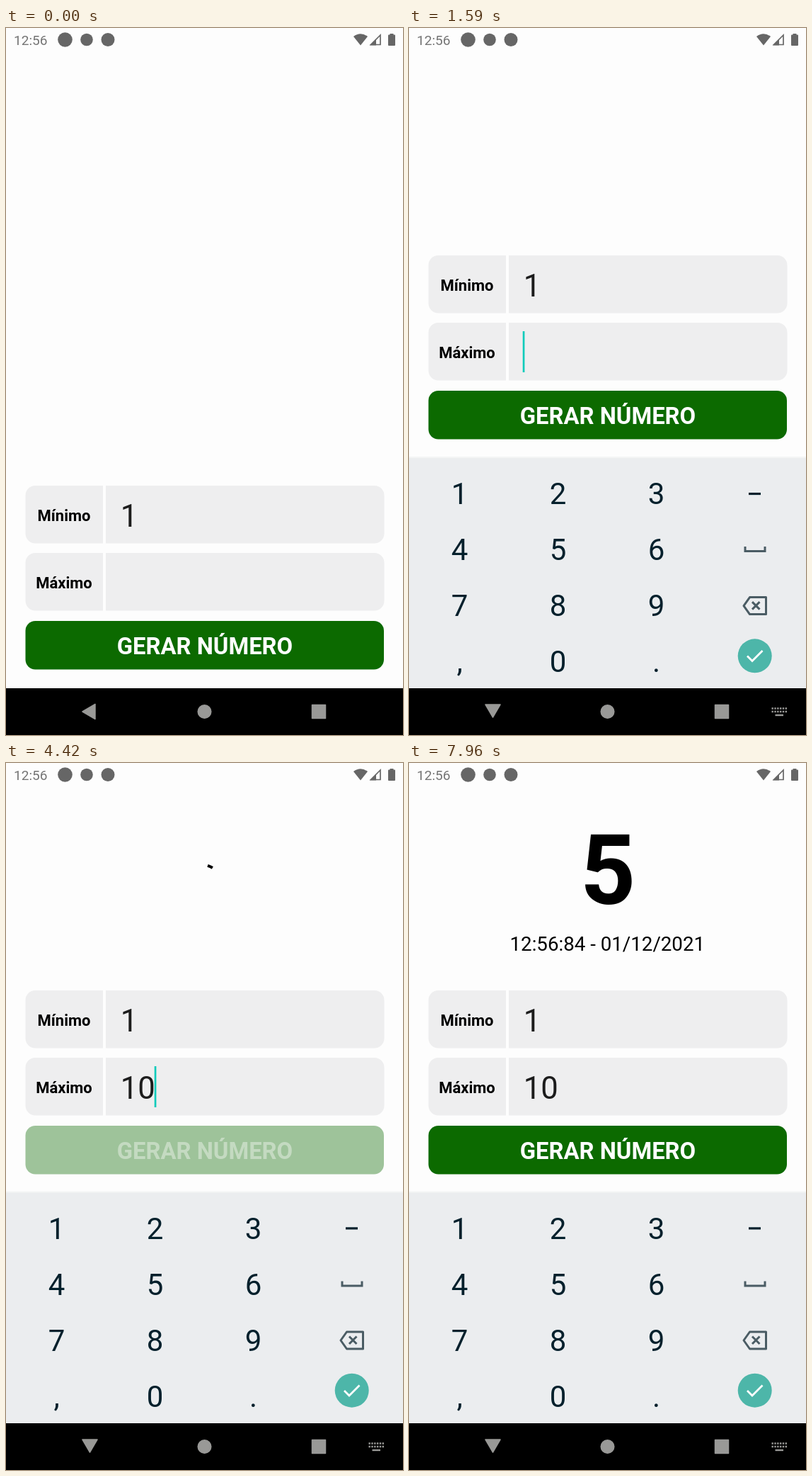
An HTML page that plays this animation: 561 by 998 pixels, repeating every 8000 ms.

```html
<!DOCTYPE html>
<html lang="pt">
<head>
<meta charset="utf-8">
<title>Gerar número</title>
<style>
  html, body { margin: 0; width: 100%; height: 100%; overflow: hidden; background: #fdfdfd; }
  svg { display: block; width: 100%; height: 100%; font-family: Roboto, sans-serif; }
  .mid { text-anchor: middle; }
  .bold { font-weight: 700; }
  .label { font-size: 22px; }
  .value { font-size: 43.64px; fill: #1c1c1c; }
  .field { fill: #eeeeef; }
  .key { font-size: 42px; fill: #04202c; }
  .line { fill: none; stroke: #4a5c64; stroke-width: 3; }
</style>
</head>
<body>
<svg viewBox="0 0 561 998">
  <rect width="561" height="998" fill="#fdfdfd"/>

  <g id="status" fill="#666">
    <text x="11" y="24" font-size="19.1" fill="#757575">12:56</text>
    <circle cx="83.5" cy="16.5" r="10.3"/>
    <circle cx="114" cy="16.5" r="8.8"/>
    <circle cx="144" cy="16.5" r="9.5"/>
    <path d="M491 12Q501 4.500 511 12L501 24.500Z"/>
    <path d="M515.500 23.500L529 10V23.500Z" fill="none" stroke="#666" stroke-width="1.7"/>
    <path d="M514 24.500L523 15.500V24.500Z"/>
    <path d="M542.500 9.500V8H547.500V9.500H549Q550 9.500 550 10.500V24Q550 25 549 25H541Q540 25 540 24V10.500Q540 9.500 541 9.500Z"/>
  </g>

  <circle id="spinner" cx="281" cy="163" r="18.4" pathLength="360" fill="none"
    stroke="#000" stroke-width="4.1" stroke-linecap="square"/>
  <g id="result" class="mid">
    <text class="bold" x="281" y="198.700" font-size="136.4">5</text>
    <text x="280.300" y="265" font-size="27.7">12:56:84 - 01/12/2021</text>
  </g>

  <g id="form">
    <g id="fields"></g>
    <rect id="cursor" y="753" width="2.700" height="58" fill="#0fcbbb"/>
    <rect id="button" x="27.500" y="837" width="506.500" height="68.500" rx="14" fill="#0c6a00"/>
    <text id="caption" class="mid bold" x="281" y="884" font-size="32.8" fill="#fff">GERAR NÚMERO</text>
  </g>

  <g id="keyboard">
    <rect y="604.500" width="561" height="3" fill="#f4f5f5"/>
    <rect y="606.500" width="561" height="366" fill="#ebedef"/>
    <g id="keys" class="mid key"></g>
    <rect x="480" y="655.300" width="17" height="3.200" fill="#04202c"/>
    <path class="line" d="M475 731.500V738H503V731.500"/>
    <path class="line" stroke-linejoin="round" d="M481.500 803H504.500V827H481.500L473 815Z"/>
    <path class="line" d="M485 809.500L495.500 820M495.500 809.500L485 820"/>
    <circle cx="488.700" cy="885.700" r="24" fill="#4db6a9"/>
    <path d="M478 886L485 893L499.500 878.500" fill="none" stroke="#fff" stroke-width="2.800"/>
  </g>

  <rect y="932" width="561" height="66"/>
  <g fill="#999997" stroke="#999997" stroke-width="1.500" stroke-linejoin="round">
    <path id="back" d="M108 965L126 954.500V975.500Z"/>
    <path id="down" d="M108 955H129L118.500 973Z"/>
    <circle cx="280.500" cy="965" r="9.300"/>
    <rect x="432.500" y="955.500" width="19" height="19"/>
  </g>
  <g id="switcher" fill="none" stroke="#999997" stroke-width="2.400">
    <path d="M512.500 960.500H534M512.500 965H534" stroke-dasharray="2.400 1.420"/>
    <path d="M517.500 970H529"/>
  </g>
</svg>
<script>
const LOOP = 8000;
const FOCUS = 1250, SLIDE = 1280, SLIDE_TIME = 360, RESIZE = 1400;
const TYPE_ONE = 2400, TYPE_ZERO = 3150;
const PRESS = 4185, RELEASE = 4334;
const SPIN = 4345, CYCLE = 1241, DONE = 6340;

const $ = id => document.getElementById(id);
const clamp = x => Math.min(1, Math.max(0, x));
const show = (id, on) => $(id).setAttribute('visibility', on ? 'visible' : 'hidden');
const set = (id, name, value) => $(id).setAttribute(name, value);

$('fields').innerHTML = [['Mínimo', 646, '1', 'min'], ['Máximo', 741, '', 'max']]
  .map(([label, y, value, id]) => `
    <path class="field" d="M137 ${y}H41.500a14 14 0 0 0 -14 14v53.500a14 14 0 0 0 14 14H137Z"/>
    <path class="field" d="M141 ${y}H520.500a14 14 0 0 1 14 14v53.500a14 14 0 0 1 -14 14H141Z"/>
    <text class="mid bold label" x="82" y="${y + 49.5}">${label}</text>
    <text class="value" id="${id}" x="161.700" y="${y + 58}">${value}</text>`).join('');

$('keys').innerHTML = [...'123456789,0.'].map((key, i) =>
  `<text x="${71.6 + 139 * (i % 3)}" y="${671.8 + 79 * Math.floor(i / 3)}">${key}</text>`).join('');

// Cubic curve from (0,0) to (1,1) with control heights 0 and 1, solved for y at x.
function curve(x, x1, x2) {
  let lo = 0, hi = 1;
  for (let i = 0; i < 24; i++) {
    const u = (lo + hi) / 2, v = 1 - u;
    if (3 * x1 * u * v * v + 3 * x2 * u * u * v + u * u * u < x) lo = u; else hi = u;
  }
  return lo * lo * (3 - 2 * lo);
}

function drawSpinner(t) {
  const on = t >= SPIN && t < DONE;
  show('spinner', on);
  if (!on) return;
  const turns = (t - SPIN) / CYCLE, x = turns % 1;
  const tail = 270 * curve(clamp(2 * x - 1), 0.4, 0.2);
  const head = 270 * curve(clamp(2 * x), 0.4, 0.2);
  const angle = tail + 90 * x + 216 * turns - 90;
  set('spinner', 'stroke-dasharray', `${Math.max(0.1, head - tail)} 360`);
  set('spinner', 'transform', `rotate(${angle} 281 163)`);
}

function ease(p) {
  return p < 0.5 ? 2 * p * p : 1 - 2 * (1 - p) * (1 - p);
}

function buttonOpacity(t) {
  if (t < RELEASE) return 1 - 0.8 * ease(clamp((t - PRESS) / 140));
  return 0.2 + 0.8 * ease(clamp((t - RELEASE) / 250));
}

function draw(t) {
  const open = t >= SLIDE;
  set('form', 'transform', `translate(0 ${t >= RESIZE ? -325 : 0})`);

  const left = 1 - clamp((t - SLIDE) / SLIDE_TIME);
  show('keyboard', open);
  set('keyboard', 'transform', `translate(0 ${33 * left * left})`);
  set('keyboard', 'opacity', 1 - left ** 3);
  show('back', !open);
  show('down', open);
  show('switcher', open);

  const typed = t >= TYPE_ZERO ? '10' : t >= TYPE_ONE ? '1' : '';
  const edited = [FOCUS, TYPE_ONE, TYPE_ZERO][typed.length];
  $('max').textContent = typed;
  set('cursor', 'x', 161 + 24.5 * typed.length - 0.3);
  show('cursor', t >= FOCUS && (t - edited) % 1000 < 500);

  // Background and caption fade separately, so the caption shows the green through.
  const opacity = buttonOpacity(t);
  set('button', 'opacity', opacity);
  set('caption', 'opacity', opacity);

  drawSpinner(t);
  show('result', t >= DONE);
}

const start = performance.now();
function tick() {
  draw((performance.now() - start) % LOOP);
  requestAnimationFrame(tick);
}
tick();
</script>
</body>
</html>
```
